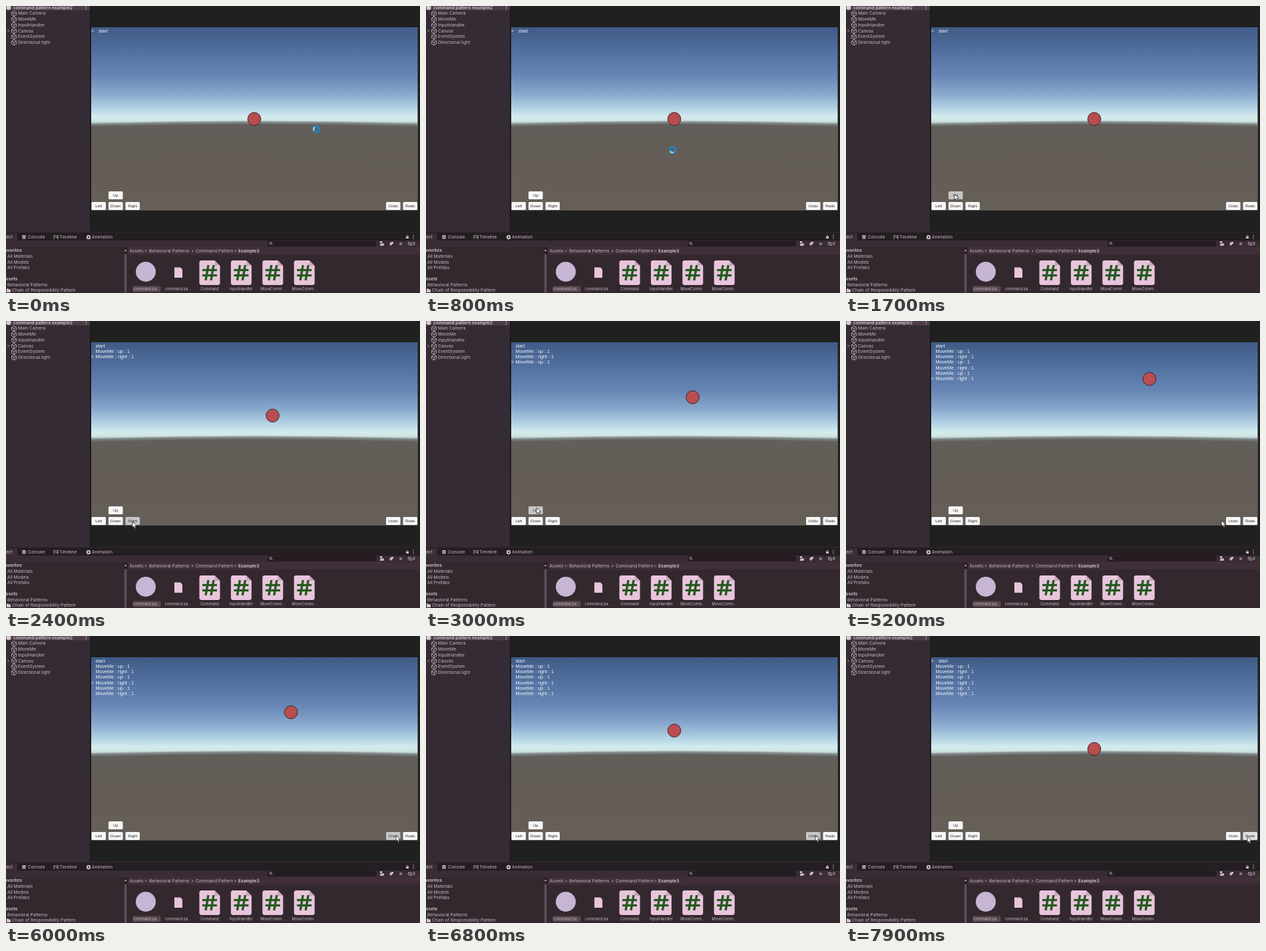
Write an HTML page with a canvas that moves like this. It is 622 px wide and 432 px high and loops after 8 s.

```html
<!DOCTYPE html>
<html lang="en">
<head>
<meta charset="utf-8">
<title>Command pattern</title>
<style>
html, body { margin: 0; width: 100%; height: 100%; overflow: hidden; background: #202020; }
canvas { display: block; }
</style>
</head>
<body>
<canvas id="stage" width="622" height="432"></canvas>
<script>
const ctx = document.getElementById('stage').getContext('2d');
const UI = 'Inter, sans-serif';
const GAME = '"Liberation Sans", Arial, sans-serif';
const LOOP = 8000, STEP = 27.6;

const actions = [
  [1800, 'up'], [2300, 'right'], [2900, 'up'], [3500, 'right'], [4000, 'up'], [4500, 'right'],
  [5500, 'undo'], [5900, 'undo'], [6200, 'undo'], [6500, 'undo'], [6700, 'undo'], [7100, 'undo']
];
const buttons = {
  up: ['Up', 154, 279], left: ['Left', 128.5, 295], down: ['Down', 154, 295],
  right: ['Right', 179.5, 295], undo: ['Undo', 571, 295], redo: ['Redo', 596.5, 295]
};
// time, x, y of the pointer tip
const pointer = [
  [0, 466, 185], [500, 466, 185], [1300, 163, 283], [1900, 163, 283], [2200, 190, 302],
  [2400, 190, 302], [2700, 166, 281], [3000, 166, 281], [3300, 190, 303], [3600, 190, 303],
  [3800, 165, 282], [4100, 165, 282], [4300, 192, 304], [4600, 192, 304], [5300, 586, 300],
  [6100, 586, 300], [6300, 585, 300], [7600, 585, 300], [7800, 603, 302], [8000, 603, 302]
];

function rect(x, y, w, h, color, radius = 0) {
  ctx.fillStyle = color;
  ctx.beginPath();
  ctx.roundRect(x, y, w, h, radius);
  ctx.fill();
}
function text(s, x, y, { size = 6.6, color = '#c5bac2', font = UI, weight = 400, align = 'left' } = {}) {
  ctx.font = `${weight} ${size}px ${font}`;
  ctx.fillStyle = color;
  ctx.textAlign = align;
  ctx.textBaseline = 'middle';
  ctx.fillText(s, x, y);
}
function path(points, { fill, stroke, width = 0.8, close = true }) {
  ctx.beginPath();
  points.forEach(([x, y]) => ctx.lineTo(x, y));
  if (close) ctx.closePath();
  if (fill) { ctx.fillStyle = fill; ctx.fill(); }
  if (stroke) { ctx.strokeStyle = stroke; ctx.lineWidth = width; ctx.stroke(); }
}
function line(color, ...points) {
  path(points, { stroke: color, close: false });
}
function disc(x, y, r, fill, stroke, width = 1) {
  ctx.beginPath();
  ctx.arc(x, y, r, 0, Math.PI * 2);
  if (fill) { ctx.fillStyle = fill; ctx.fill(); }
  if (stroke) { ctx.strokeStyle = stroke; ctx.lineWidth = width; ctx.stroke(); }
}
function gradient(y0, y1, stops) {
  const g = ctx.createLinearGradient(0, y0, 0, y1);
  stops.forEach(([at, color]) => g.addColorStop(at, color));
  return g;
}

function cube(x, y) {
  const c = '#c5bac2';
  path([[x, y - 4], [x + 3.5, y - 2], [x + 3.5, y + 2], [x, y + 4], [x - 3.5, y + 2], [x - 3.5, y - 2]], { stroke: c });
  line(c, [x - 3.5, y - 2], [x, y], [x + 3.5, y - 2]);
  line(c, [x, y], [x, y + 4]);
}

function hierarchy() {
  rect(0, 0, 127, 341, '#352b34');
  rect(0, 0, 126, 6.5, '#4c3d46');
  disc(4, 2.5, 3.5, '#d6cad4');
  text('command pattern example2', 11, 3, { weight: 600, color: '#d8ced5' });
  for (const y of [0.5, 2.8, 5.1]) disc(120.5, y, 0.7, '#c5bac2');
  ['Main Camera', 'MoveMe', 'InputHandler', 'Canvas', 'EventSystem', 'Directional light'].forEach((name, i) => {
    const y = 11.5 + i * 8.7;
    cube(12, y);
    text(name, 18, y);
  });
  path([[2.5, 35.5], [5.5, 37.5], [2.5, 39.5]], { fill: '#786c75' });
  rect(126, 0, 1.5, 341, '#1c181b');
}

function scriptIcon(x, label) {
  const l = x - 15.5, r = x + 15.5;
  path([[l + 2, 383], [r - 8, 383], [r, 391], [r, 418], [r - 2, 420], [l + 2, 420], [l, 418], [l, 385]], { fill: '#e8c5dc' });
  path([[r - 8, 383], [r, 391], [r - 8, 391]], { fill: '#c9a6bd' });
  ctx.lineCap = 'butt';
  for (const d of [-4, 4]) {
    path([[x + d + 2, 390], [x + d - 2, 413]], { stroke: '#24591f', width: 3.4, close: false });
    path([[x - 11, 401.5 + d], [x + 11, 401.5 + d]], { stroke: '#24591f', width: 3.2, close: false });
  }
  text(label, x, 426, { size: 5.7, align: 'center' });
}

function tabs() {
  const c = '#c9bec6';
  rect(0, 341, 622, 12, '#241d22');
  rect(0, 342, 17, 11, '#3a2d36');
  text('Project', 10, 348, { align: 'right', color: c });
  rect(24.5, 345, 5, 5.5, c);
  line('#3a2d36', [25.5, 347], [28.5, 347]);
  line('#3a2d36', [25.5, 349], [28.5, 349]);
  text('Console', 33, 348, { color: c });
  line(c, [72, 345], [72, 351]);
  line(c, [72, 346], [78, 346]);
  line(c, [74, 348.5], [78, 348.5]);
  line(c, [78, 345], [78, 351]);
  text('Timeline', 80, 348, { color: c });
  disc(124, 348, 3.2, c);
  path([[123, 346.5], [126, 348], [123, 349.5]], { fill: '#241d22' });
  text('Animation', 129, 348, { color: c });
  rect(601, 347, 4, 3, c);
  ctx.beginPath();
  ctx.arc(603, 346.8, 1.5, Math.PI, 0);
  ctx.strokeStyle = c;
  ctx.lineWidth = 0.7;
  ctx.stroke();
  for (const y of [345, 347.5, 350]) disc(612, y, 0.7, c);
}

function project() {
  rect(0, 340, 622, 92, '#34282f');
  tabs();
  rect(0, 353, 622, 10, '#392c35');
  rect(393, 353.5, 163, 8.5, '#251c22', 2);
  disc(397.5, 357, 1.6, null, '#c5bac2', 0.8);
  line('#c5bac2', [398.7, 358.2], [400.5, 360]);
  rect(562, 354, 3, 3, '#cdbfc9');
  disc(566, 359, 2, '#cdbfc9');
  rect(562, 358, 2.5, 3, '#cdbfc9');
  path([[576, 358], [579, 355], [582, 355], [582, 357], [578, 361]], { fill: '#cdbfc9' });
  path(Array.from({ length: 10 }, (_, i) => {
    const a = -Math.PI / 2 + i * Math.PI / 5, r = i % 2 ? 1.4 : 3.2;
    return [593 + r * Math.cos(a), 358 + r * Math.sin(a)];
  }), { fill: '#93838d' });
  ctx.beginPath();
  ctx.ellipse(607, 358, 3, 2, 0, 0, Math.PI * 2);
  ctx.strokeStyle = '#c5bac2';
  ctx.stroke();
  line('#c5bac2', [604, 355], [610, 361]);
  text('8', 611, 358, { size: 6.4 });

  text('Favorites', -6, 368, { weight: 700 });
  ['All Materials', 'All Models', 'All Prefabs'].forEach((s, i) => text(s, 2, 377 + i * 8.6));
  text('Assets', -5, 411, { weight: 700 });
  text('Behavioral Patterns', 2, 419.7);
  rect(1, 425.5, 3, 2, '#d3c5cf');
  rect(1, 426.5, 6, 4.5, '#d3c5cf');
  text('Chain of Responsibility Pattern', 9, 428.5);
  rect(176.5, 363, 6, 69, '#2b2228');
  rect(177.5, 373, 4, 59, '#5b4d56', 2);
  path([[177.5, 369], [179.5, 366.5], [181.5, 369]], { fill: '#b5a8b1' });

  rect(183, 363, 439, 11.5, '#402e38');
  text('Assets', 185.5, 369);
  text('>', 208, 369);
  text('Behavioral Patterns', 215, 369);
  text('>', 278, 369);
  text('Command Pattern', 285, 369);
  text('>', 342.5, 369);
  text('Example3', 349, 369, { weight: 600, color: '#d8ced5' });

  disc(210, 400, 15, '#c6b6d3');
  rect(190.5, 421.5, 42, 9, '#58474f', 2);
  text('command pa...', 211, 426, { size: 5.7, align: 'center' });
  path([[253, 393.5], [262, 393.5], [265, 396.5], [265, 409], [253, 409]], { fill: '#e8c5dc' });
  text('command pa...', 258.5, 426, { size: 5.7, align: 'center' });
  ['Command', 'InputHandler', 'MoveComm...', 'MoveComm...'].forEach((s, i) => scriptIcon(306 + i * 47.4, s));
}

function scene() {
  rect(127, 0, 495, 341, '#202020');
  ctx.save();
  ctx.beginPath();
  ctx.rect(128, 32, 490.5, 275.5);
  ctx.clip();
  ctx.fillStyle = gradient(32, 180, [
    [0, '#415b86'], [0.25, '#5270a0'], [0.5, '#6787b5'], [0.68, '#88a9cd'],
    [0.82, '#b1d0e3'], [0.91, '#d3ebee'], [0.95, '#d0e5e4'], [1, '#a3b5b5']
  ]);
  ctx.fillRect(128, 32, 491, 150);
  // The horizon bows up slightly in the middle.
  for (let i = 0; i < 8; i++) {
    const y = 172 + i * 0.75;
    ctx.beginPath();
    ctx.moveTo(128, y + 4);
    ctx.quadraticCurveTo(373, y - 3, 619, y + 4);
    ctx.lineTo(619, 308);
    ctx.lineTo(128, 308);
    ctx.fillStyle = i < 7 ? 'rgba(100,101,99,0.25)' : gradient(175, 308, [[0, '#625f5b'], [0.2, '#635d57'], [1, '#665f58']]);
    ctx.fill();
  }
  ctx.restore();
}

function stateAt(t) {
  const history = [];
  let current = 0;
  for (const [time, kind] of actions) {
    if (time > t) break;
    if (kind === 'undo') current--;
    else { history.push(kind); current = history.length; }
  }
  const done = history.slice(0, current);
  const count = kind => done.filter(k => k === kind).length;
  return { history, current, x: 373 + STEP * count('right'), y: 170 - STEP * count('up') };
}

function pointerAt(t) {
  const i = Math.max(1, pointer.findIndex(p => p[0] > t));
  const [t0, x0, y0] = pointer[i - 1], [t1, x1, y1] = pointer[i];
  const u = (t - t0) / (t1 - t0), k = u * u * (3 - 2 * u);
  return [x0 + (x1 - x0) * k, y0 + (y1 - y0) * k];
}

function drawLog({ history, current }) {
  const style = { size: 7.2, color: '#f2f5f8', font: GAME };
  text('start', current ? 134.5 : 139, 38, style);
  history.forEach((kind, i) => text(`MoveMe : ${kind} : 1`, 134.5, 46.2 + i * 8.15, style));
  text('>', 127.8, 38 + current * 8.15, style);
}

function drawButtons(t, px, py) {
  for (const [id, [label, x, y]] of Object.entries(buttons)) {
    const over = t >= 1000 && px >= x && px <= x + 22 && py >= y && py <= y + 12;
    const pressed = over && actions.some(([time, kind]) => kind === id && t >= time - 100 && t <= time + 100);
    rect(x, y, 21.5, 12, pressed ? '#c6c6c6' : over ? '#e0e0e0' : '#f6f6f6', 1.5);
    text(label, x + 10.75, y + 6.2, { size: 6, color: '#303030', font: GAME, align: 'center' });
  }
}

function drawPointer(t, x, y) {
  if (t < 900) {
    disc(x + 0.5, y + 0.5, 4.2, null, '#168bd8', 2.6);
    ctx.beginPath();
    ctx.arc(x + 0.5, y + 0.5, 4.2, t / 160 + 2.6, t / 160 + 4);
    ctx.strokeStyle = '#7bd0f6';
    ctx.stroke();
    return;
  }
  path([[0, 0], [0, 9], [2.1, 7.1], [3.6, 10.4], [5.1, 9.7], [3.7, 6.5], [6.5, 6.4]].map(([a, b]) => [x + a, y + b]),
    { fill: '#fff', stroke: '#222', width: 0.8 });
}

function draw(t) {
  const state = stateAt(t), [px, py] = pointerAt(t);
  scene();
  hierarchy();
  project();
  disc(state.x, state.y, 9.8, '#b94d50', '#3b2429', 1);
  drawLog(state);
  drawButtons(t, px, py);
  drawPointer(t, px, py);
}

function tick() {
  draw(Math.floor(performance.now() % LOOP / 100) * 100);
  requestAnimationFrame(tick);
}
tick();
</script>
</body>
</html>
```
